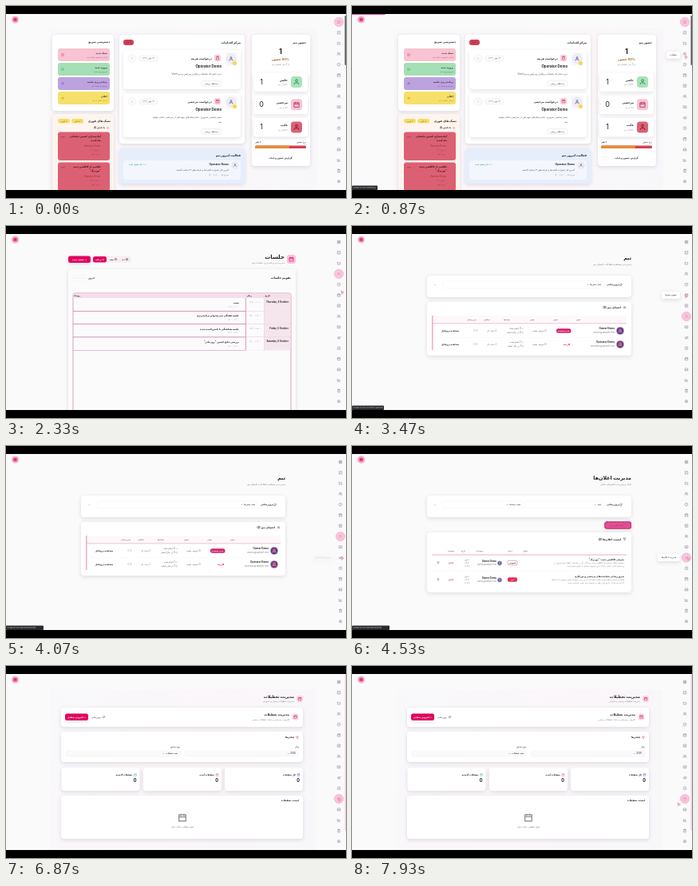
Write an HTML page with a canvas that moves like this. It is 426 px wide and 240 px high and loops after 8 s.

```html
<!DOCTYPE html>
<html lang="fa">
<head>
<meta charset="utf-8">
<style>
html, body { margin: 0; width: 100%; height: 100%; overflow: hidden; background: #000; }
canvas { display: block; width: 100vw; height: 100vh; }
</style>
</head>
<body>
<canvas id="stage"></canvas>
<script>
const canvas = document.getElementById('stage');
const ctx = canvas.getContext('2d');
const dpr = window.devicePixelRatio || 1;
canvas.width = 426 * dpr;
canvas.height = 240 * dpr;

const LOOP = 8000;
const INK = '#25232b', GREY = '#85838c', CRIMSON = '#e0045f', PINK = '#f9c5dc';
const STAFF = 'Operator Demo', OWNER = 'Owner Demo';

// Line icons on a 24 unit grid
const ICONS = {
  grid: 'M3 3h7v7H3zM14 3h7v7h-7zM14 14h7v7h-7zM3 14h7v7H3z',
  check: 'M3 3h18v18H3zM8 12l3 3 5-6',
  folder: 'M3 5h6l2 3h10v12H3z',
  users: 'M2 21v-3q0-4 4-4h6q4 0 4 4v3M13 7a4 4 0 1 1-8 0a4 4 0 1 1 8 0M22 21v-3q0-3-3-4M16 3a4 4 0 0 1 0 8',
  user: 'M4 21v-2q0-4 4-4h8q4 0 4 4v2M16 7a4 4 0 1 1-8 0a4 4 0 1 1 8 0',
  palette: 'M12 2a10 10 0 1 0 0 20q3 0 2-3t2-3h3q3 0 3-4A10 10 0 0 0 12 2M8 8v1M13 6v1M17 10v1M7 13v1',
  calendar: 'M3 5h18v16H3zM3 10h18M8 2v5M16 2v5',
  plus: 'M3 3h18v18H3zM8 12h8M12 8v8',
  book: 'M12 7v14M12 7q-2-3-10-3v14q8 0 10 3q2-3 10-3V4q-8 0-10 3',
  horn: 'M3 11l18-6v14L3 14zM8 16l1 5h3l-1-4',
  clock: 'M22 12a10 10 0 1 1-20 0a10 10 0 1 1 20 0M12 6v6l4 2',
  inbox: 'M5 4h14l3 9v7H2v-7zM2 13h6l2 3h4l2-3h6',
  chart: 'M3 3v18h18M8 17v-5M13 17V6M18 17V10',
  clip: 'M5 4h14v18H5zM9 2h6v4H9zM9 14l2 2 4-4',
  gear: 'M15 12a3 3 0 1 1-6 0a3 3 0 1 1 6 0M12 2l3 3h4v4l3 3-3 3v4h-4l-3 3-3-3H5v-4l-3-3 3-3V5h4z',
  search: 'M18 11a7 7 0 1 1-14 0a7 7 0 1 1 14 0M16 16l5 5',
  refresh: 'M3 12a9 9 0 0 1 15-6l3 3M21 3v6h-6M21 12a9 9 0 0 1-15 6l-3-3M3 21v-6h6',
  filter: 'M2 3h20l-8 10v8l-4-2v-6z',
  left: 'M15 5l-7 7 7 7',
  right: 'M9 5l7 7-7 7'
};
for (const name in ICONS) ICONS[name] = new Path2D(ICONS[name]);
const SIDEBAR = ['grid', 'check', 'folder', 'users', 'palette', 'calendar', 'plus', 'users',
  'book', 'horn', 'clock', 'calendar', 'inbox', 'chart', 'clip', 'gear'];
const sideY = i => 20 + i * 13.28;

const clamp = v => Math.max(0, Math.min(1, v));
const easeOut = v => 1 - (1 - clamp(v)) ** 3;
const easeInOut = v => v * v * (3 - 2 * v);

function box(x, y, x2, y2, fill, r = 0, stroke) {
  ctx.beginPath();
  ctx.roundRect(x, y, x2 - x, y2 - y, r);
  if (fill) { ctx.fillStyle = fill; ctx.fill(); }
  if (stroke) { ctx.strokeStyle = stroke; ctx.lineWidth = .6; ctx.stroke(); }
}
function card(x, y, x2, y2, fill = '#fff', r = 4) {
  ctx.save();
  ctx.shadowColor = '#30204024';
  ctx.shadowBlur = 5 * dpr;
  ctx.shadowOffsetY = 1.5 * dpr;
  box(x, y, x2, y2, fill, r);
  ctx.restore();
}
function disc(x, y, r, fill, stroke) {
  box(x - r, y - r, x + r, y + r, fill, r, stroke);
}
function icon(name, x, y, size = 4, color = '#77757d') {
  ctx.save();
  ctx.translate(x - size / 2, y - size / 2);
  ctx.scale(size / 24, size / 24);
  ctx.strokeStyle = color;
  ctx.lineWidth = 2.4;
  ctx.stroke(ICONS[name]);
  ctx.restore();
}
// An underscore stands for the zero-width non-joiner
function text(s, x, y, size = 3.2, color = INK, bold = false, align = 'right') {
  ctx.font = `${bold ? 'bold ' : ''}${size}px Inter, "DejaVu Sans", sans-serif`;
  ctx.direction = 'rtl';
  ctx.textAlign = align;
  ctx.textBaseline = 'middle';
  ctx.fillStyle = color;
  ctx.fillText(s.replaceAll('_', String.fromCharCode(8204)), x, y);
}
const bold = (s, x, y, size = 3.6, color = INK, align) => text(s, x, y, size, color, true, align);
const note = (s, x, y, size = 2.7, align) => text(s, x, y, size, GREY, false, align);
const mid = (s, x, y, size = 2.8, color = INK, heavy) => text(s, x, y, size, color, heavy, 'center');
function button(s, x, y, x2, y2) {
  card(x, y, x2, y2, CRIMSON, 2.5);
  mid(s, (x + x2) / 2, (y + y2) / 2, 2.8, '#fff', true);
}
function badge(name, x, y, r, fill, color) {
  box(x - r, y - r, x + r, y + r, fill, r * .55);
  icon(name, x, y, r * 1.2, color);
}
function avatar(x, y, r, fill) {
  disc(x, y, r, fill, '#d9d4ec');
  icon('user', x, y, r * 1.15, fill === '#f0effa' ? '#39364b' : '#fff');
}
function panel(x, y, x2) {
  const g = ctx.createLinearGradient(x, y, x2, 230);
  g.addColorStop(0, '#f8f8fb');
  g.addColorStop(.5, '#fbf6f9');
  g.addColorStop(1, '#f7f7fa');
  box(x, y, x2, 230, g, 4);
}

function requestCard(dy, y2, title, symbol, date, lines) {
  card(147, 55 + dy, 294, y2, '#fff', 4);
  box(274, 58 + dy, 290, 75 + dy, '#f8f7fc', 4);
  avatar(282, 66 + dy, 5.5, '#f0effa');
  disc(286.5, 71.5 + dy, 2.5, '#f7d94a');
  badge(symbol, 265, 65 + dy, 4.2, '#f8d3df', '#c22a5c');
  bold(title, 258, 65.5 + dy, 3.4);
  box(167, 62 + dy, 190, 69 + dy, '#fafafa', 3, '#ececf0');
  mid(date, 178.5, 65.5 + dy, 2.7, '#55535c');
  disc(158, 65.5 + dy, 5, '#fafafa', '#ececf0');
  icon('left', 158, 65.5 + dy, 3.5);
  bold(STAFF, 270, 76 + dy, 4.4);
  lines.forEach((s, i) => text(s, 270, 85 + dy + i * 6.5, 3, '#55535c'));
  const y = 97 + dy + (lines.length - 1) * 6;
  box(245, y - 3.3, 270, y + 3.3, '#fff', 2, '#e4e3e8');
  mid('در انتظار بررسی', 257.5, y, 2.6);
}

function dashboard() {
  panel(52, 28, 390);
  card(58, 36, 135, 131);
  bold('دسترسی سریع', 130, 45, 3.6);
  [['تسک جدید', 'ایجاد و تخصیص تسک جدید', '#f8c3d2', '#cf3d6c', 'plus'],
   ['پروژه جدید', 'شروع پروژه جدید', '#a5dfb5', '#26874c', 'folder'],
   ['برنامه_ریزی جلسه', 'زمان_بندی جلسه تیم', '#bca3df', '#7040ad', 'users'],
   ['اعلان', 'ارسال اعلان به تیم', '#f6e069', '#ad8d08', 'horn']
  ].forEach(([title, sub, fill, ink, symbol], i) => {
    const y = 53 + i * 18;
    box(65, y, 130, y + 16, fill, 3);
    icon(symbol, 71, y + 8, 3.6, ink);
    bold(title, 127, y + 6, 3, '#3c3442');
    text(sub, 127, y + 11, 2.4, ink);
  });

  card(58, 135, 135, 236, '#fdf5ee');
  bold('تسک های فوری', 131, 144, 3.7);
  [[65, '۲ فوری'], [82, '۵ تاخیر']].forEach(([x, s]) => {
    box(x, 141, x + 15, 146.5, '#f7dc68', 2.5);
    mid(s, x + 7.5, 144, 2.5, '#755b08');
  });
  icon('clock', 127.5, 152.5, 3, '#d93c57');
  bold('با تاخیر (5)', 124, 152.5, 2.8);
  [['آماده_سازی کمپین تبلیغاتی', 'ماه آینده'],
   ['عکاسی از کالکشن جدید', '"نوربرگ"']].forEach((lines, i) => {
    const y = 157.5 + i * 38;
    box(65, y, 130, y + 35.5, '#dc6073', 3);
    lines.forEach((s, n) => bold(s, 119, y + 5.5 + n * 5.5, 3.1, '#351420'));
    mid('فوری', 71, y + 5.5, 2.4, '#6b2437');
    text(STAFF, 118, y + 18, 2.8, '#8c3348');
    text('۱۰ مهر ۱۴۰۴', 118, y + 23, 2.4, '#8c3348');
    text('۱ روز تاخیر', 118, y + 28, 2.4, '#8c3348');
  });

  card(142, 36, 299, 172);
  bold('مرکز اقدامات', 294, 45.5, 3.7);
  box(147, 42, 160, 49, '#cf4059', 3);
  mid('۲ مورد', 153.5, 45.5, 2.5, '#511320');
  requestCard(0, 104, 'درخواست هزینه', 'clip', '۱۳ مهر, ۱۴۰۴',
    ['خرید اشتراک یکساله نرم_افزار ویرایش ویدیو Vorel']);
  requestCard(54, 164, 'درخواست مرخصی', 'calendar', '۱۲ مهر, ۱۴۰۴',
    ['سفر شخصی ضروری. تمام تسک_های مهم قبل از مرخصی انجام خواهد', 'شد.']);

  card(142, 178, 299, 222, '#e6eefc');
  bold('فعالیت امروز تیم', 294, 186.5, 3.8);
  box(147, 193, 294, 217, '#f3f7fd', 4);
  avatar(287, 199, 4, '#f0effa');
  bold(STAFF, 279, 198.5, 3.3);
  text('آخرین کار: پاسخ به کامنت_ها و دایرکت_های ۲۴ ساعت گذشته', 279, 205, 2.7, '#45434c');
  note('شروع کار: ۱۲:۰۰ تا ۱۴:۰۰', 279, 211, 2.4);
  text('✓ ۱ کار تکمیل شده', 176, 198.5, 2.7, '#178b61');

  card(308, 36, 381, 200);
  bold('حضور تیم', 376, 45.5, 3.5);
  mid('1', 344, 57, 9, INK, true);
  mid('50% حضور', 344, 66.5, 4, '#a5671f', true);
  note('از 2 نفر اعضای تیم', 344, 73, 2.8, 'center');
  [['حاضر', '50% از تیم', '1', '#a9e3b9', '#24804a'],
   ['مرخصی', '0% از تیم', '0', '#f7c4d3', '#b53461'],
   ['غایب', '50% از تیم', '1', '#dc6073', '#6d1429']].forEach(([name, sub, n, fill, ink], i) => {
    const y = 95 + i * 28.3;
    card(310, y - 11.5, 378, y + 12, '#fff', 3);
    badge(i === 1 ? 'calendar' : 'user', 364, y, 7, fill, ink);
    bold(name, 353, y - 2.5, 3.7);
    note(sub, 353, y + 3.5, 2.5);
    mid(n, 320, y, 9, INK);
  });
  text('نرخ حضور', 376, 170, 2.8);
  bold('1 نفر', 319, 170, 2.7);
  box(312, 174.5, 376, 178, '#d6404f', 1.5);
  box(312, 174.5, 355, 178, '#e68b3b', 1.5);
  box(313, 185, 376, 196, '#fff', 3);
  mid('گزارش حضور و غیاب', 344, 190.5, 2.9, INK, true);
}

function meetings() {
  bold('جلسات', 349, 38.5, 7);
  note('مدیریت و برنامه_ریزی جلسات تیم', 349, 46, 3);
  badge('calendar', 357.5, 41.5, 5.5, '#f7c3d8', CRIMSON);
  button('+  جلسه جدید', 78, 37.5, 106, 46);
  box(108, 37.5, 157, 46, '#f8eef2', 3);
  box(109, 38, 126, 45.5, CRIMSON, 2.5);
  mid('☰ برنامه', 117.5, 41.7, 2.7, '#fff', true);
  mid('هفته', 132, 41.7, 2.8);
  icon('calendar', 137.5, 41.7, 3, INK);
  mid('ماه', 147, 41.7, 2.8);
  icon('grid', 151.5, 41.7, 3, INK);
  card(78, 54, 363, 240, '#fcfbfc');
  bold('تقویم جلسات', 357, 65, 3.8);
  mid('امروز', 107, 65, 2.8, INK, true);
  [['right', 87], ['left', 96]].forEach(([s, x]) => {
    disc(x, 65, 3.5, '#fff', '#eeecef');
    icon(s, x, 65, 2.8, INK);
  });
  box(84, 84, 357, 235, '#fcfbfc', 2, '#bd6694');
  box(84.3, 84.3, 356.7, 90, '#f5deea');
  bold('تاریخ', 331, 87, 2.7);
  bold('زمان', 308, 87, 2.7);
  bold('رویداد', 93, 87, 2.7);
  const rows = [
    ['Thursday, 4 October', '۱۰:۰۰ – ۱۱:۳۰', 'تست'],
    ['', '۱۲:۰۰ – ۱۳:۰۰', 'جلسه هفتگی تیم محتوا و برنامه_ریزی'],
    ['Friday, 5 October', '۱۵:۰۰ – ۱۶:۳۰', 'جلسه هماهنگی با تامین_کننده جدید'],
    ['Saturday, 6 October', '۱۲:۰۰ – ۱۳:۰۰', 'بررسی نتایج کمپین "روز مادر"']];
  rows.forEach(([day, time, title], i) => {
    const y = 90 + i * 16.3;
    box(323.5, y, 356.5, y + 16, '#f5e5ed');
    if (day) bold(day, 354, y + 5.5, 2.8);
    mid(time, 312, y + 5.5, 2.5, GREY);
    bold(title, 292, y + 6, 3);
    note(time, 292, y + 11, 2.4);
    box(84, y + 16, 300, y + 16.7, '#c878a2');
    box(300, y + 16, 357, y + 16.4, '#e9c7d8');
  });
  box(300, 90, 300.7, 155, '#c878a2');
  box(323, 90, 323.4, 155, '#e5bbd0');
}

function heading(title, sub) {
  bold(title, 350, 40, 6.3);
  note(sub, 350, 48.5, 3);
  card(94, 62, 350, 89);
  icon('refresh', 337, 73.5, 3.5, INK);
  bold('بروزرسانی', 335, 73.5, 2.9);
  icon('search', 104, 73.5, 3, '#b8b5bd');
}

function team() {
  heading('تیم', 'مدیریت و مشاهده اطلاعات اعضای تیم');
  box(114, 69, 316, 78, '#fff', 3, '#f5f3f5');
  text('همه بخش_ها  ⌄', 312, 73.5, 2.8);
  card(94, 95, 350, 162);
  icon('users', 341.5, 102, 3.5, INK);
  bold('اعضای تیم (2)', 337, 102, 3.4);
  box(100, 112, 344, 122, '#fdf9fb');
  [['عضو', 284], ['نقش', 255], ['بخش', 226], ['تسک_ها', 194], ['عملکرد', 169], ['سرپرستان', 150]]
    .forEach(([s, x]) => mid(s, x, 117, 2.7, '#55535c'));
  box(100, 121.5, 344, 122.3, '#efacc9');
  box(100, 112, 101.5, 155, '#f2a8c9');
  [[OWNER, 'owner@sample.test'], [STAFF, 'operator@sample.test']].forEach(([name, mail], i) => {
    const y = 131 + i * 17;
    avatar(336, y, 4.8, i ? '#694078' : '#534285');
    disc(336, y, 2, '#e55092');
    bold(name, 329, y - 2.5, 3.1);
    note(mail, 329, y + 2.5, 2.9);
    if (i) mid('کارمند', 269, y, 2.8, CRIMSON, true);
    else {
      box(256, y - 2.8, 274.5, y + 2.8, '#d52370', 2.5);
      mid('مدیر سیستم', 265, y, 2.5, '#fff', true);
    }
    mid('○ تعریف نشده', 235, y, 2.8, '#55535c');
    text(`✓ ${i} انجام شده`, 215, y - 2.7, 2.8, '#55535c');
    text(`◷ ${i} در حال انجام`, 215, y + 2.5, 2.8, '#55535c');
    mid(`${i * 2} تسک کل`, 175, y, 2.8, GREY);
    mid('○ 0', 155, y, 2.8, GREY);
    mid('مشاهده پروفایل', 123, y, 2.8, INK, true);
    if (!i) box(102, 139.3, 344, 139.6, '#eeeaee');
  });
}

function announcements(age) {
  heading('مدیریت اعلان_ها', 'ایجاد و مدیریت اعلان_های داخلی');
  box(114, 69, 214, 78, '#fff', 3, '#f5f3f5');
  box(217, 69, 316, 78, '#fff', 3, '#f5f3f5');
  text('همه  ⌄', 312, 73.5, 2.8);
  text('همه دسته_ها  ⌄', 211, 73.5, 2.8);
  const ready = clamp((age - 330) / 250);
  button('+  ایجاد اعلان جدید', 316.5, 94.5, 350, 103.5);
  if (ready < 1) {
    ctx.save();
    ctx.globalAlpha *= 1 - ready;
    box(316.5, 94.5, 350, 103.5, '#e54f96', 2.5);
    ctx.setLineDash([1.5, 1]);
    box(317, 95, 349.5, 103, null, 2.5, '#5a1c3c');
    mid('+  ایجاد اعلان جدید', 333, 99, 2.8, '#a92865');
    ctx.restore();
  }
  card(94, 108, 350, 183);
  icon('filter', 341.5, 116.5, 4, INK);
  bold('لیست اعلان_ها (2)', 337, 116.5, 3.4);
  [['عنوان', 217], ['دسته', 198], ['نویسنده', 160], ['تاریخ', 139.5], ['وضعیت', 124]]
    .forEach(([s, x]) => mid(s, x, 131, 2.7, '#55535c'));
  box(100, 135.6, 344, 136.4, '#efacc9');
  [['معرفی کالکشن جدید: "نوربرگ"', 'با هیجان اعلام می_کنیم که کالکشن جدید زیورآلات ما در راه است. لطفا برای فروش در',
    'وب_سایت آماده باشید. جزئیات این مجموعه شامل ۱۲ طرح خاص است.'],
   ['به_روزرسانی سیاست_های مرخصی و دورکاری', 'همکاران گرامی، لطفا توجه داشته باشید که از این پس درخواست_های مرخصی باید حداقل',
    '۷۲ ساعت قبل از تاریخ مورد نظر در سیستم ثبت شوند. سیاست جدید...']
  ].forEach(([title, first, second], i) => {
    const y = 146 + i * 21;
    bold(title, 341, y - 4, 2.9);
    note(first, 341, y + .5, 2.5);
    note(second, 341, y + 4.5, 2.5);
    box(195, y - 2.8, 207, y + 2.8, i ? '#e52b55' : '#fff', 2, i ? null : '#db718f');
    mid(i ? 'تیم' : 'عمومی', 201, y, 2.5, i ? '#fff' : INK, true);
    avatar(185, y + .5, 2.8, '#6651ae');
    bold(OWNER, 181, y - 2, 2.9);
    note('owner@sample.test', 181, y + 2.5, 2.6);
    ['۶ مهر', '۱۴۰۴', '۱۱:۲۶'].forEach((s, n) => mid(s, 144, y - 4 + n * 4, 2.5, '#55535c'));
    mid('عادی', 124, y, 2.8, '#e02b56', true);
    icon('filter', 108, y, 3, INK);
    if (!i) box(100, 156.5, 344, 156.8, '#eeeaee');
  });
}

function holidays() {
  panel(55, 29, 389);
  bold('مدیریت تعطیلات', 361, 38.5, 4.8);
  note('مدیریت تعطیلات رسمی و عمومی', 361, 44.5, 2.8);
  badge('calendar', 368, 41, 4, '#fbd9e5', CRIMSON);
  card(69, 52, 372, 76);
  bold('مدیریت تعطیلات', 355, 61, 4);
  note('افزودن، ویرایش و حذف تعطیلات رسمی', 355, 67, 2.8);
  badge('calendar', 362.5, 63.5, 4, '#fbd9e5', CRIMSON);
  button('+  افزودن تعطیل', 74, 59.5, 103, 68);
  icon('refresh', 122.5, 63.7, 3.2, INK);
  text('بروزرسانی', 119, 63.7, 2.7);
  card(69, 82, 372, 120);
  icon('filter', 365, 89.5, 3.8, CRIMSON);
  bold('فیلترها', 361, 89.5, 3.1);
  text('سال', 367, 101, 2.8);
  mid('نوع نمایش', 212, 101, 2.8);
  box(224, 106, 367, 113, '#fbfafb', 3, '#f3f1f4');
  box(75, 106, 219, 113, '#fbfafb', 3, '#f3f1f4');
  text('2025  ⌄', 363, 109.5, 2.8);
  text('همه تعطیلات  ⌄', 215, 109.5, 2.8);
  [['کل تعطیلات', 372, '#4358a8'], ['تعطیلات آینده', 270, '#d24b83'], ['تعطیلات گذشته', 167.5, '#31b69b']]
    .forEach(([s, x, color]) => {
      card(x - 98, 127, x, 156);
      icon('calendar', x - 5.5, 136, 3.8, color);
      bold(s, x - 9, 136, 2.8);
      bold('0', x - 4, 143, 5.5);
    });
  card(69, 162, 372, 216);
  bold('لیست تعطیلات', 367, 168.5, 3.1);
  icon('calendar', 221, 189.5, 11.5, '#85838c');
  note('هیچ تعطیلی یافت نشد', 221, 201, 3.1, 'center');
}

const PAGES = [
  { from: -1000, draw: dashboard, active: 0, x: 417, thumb: [12, 74, '#55535c'] },
  { from: 1250, draw: meetings, active: 3, x: 417 },
  { from: 2900, draw: team, active: 7, x: 419 },
  { from: 4200, draw: announcements, active: 9, x: 419 },
  { from: 6600, draw: holidays, active: 11, x: 417, thumb: [10, 206, '#f3d0df'] }
];
// Cursor stops: time, x, y
const CURSOR = [[400, 424, 40], [800, 418, 64], [1700, 418, 63], [2330, 421, 83], [2650, 420, 114],
  [2950, 420, 114], [3400, 418, 88], [3650, 418, 88], [4100, 421, 141], [5250, 421, 141],
  [5850, 419, 153], [6150, 419, 154], [6400, 418, 167], [7300, 417, 168], [7900, 409, 173]];
// Each entry below starts with its time span
const TIPS = [[650, 1450, 'جلسات', 3, 17], [2620, 2950, 'تیم', 7, 14], [3350, 3750, 'تقویم محتوا', 5, 23],
  [4050, 4950, 'مدیریت اعلان_ها', 9, 28], [5700, 6250, 'مدیریت حضور و غیاب', 10, 38]];
const STATUS = [[700, 1400, 'localhost:3000/meetings', 32], [3200, 3850, 'localhost:3000/content-calendar', 40],
  [3850, 4950, 'localhost:3000/announcements', 47]];
const LOADING = [[830, 1250, 320], [2750, 2900, 320], [5700, 6600, 95]];
const during = t => ([from, to]) => t >= from && t < to;

function drawSidebar(page) {
  if (page.thumb) box(424.5, page.thumb[0], 426, page.thumb[1], page.thumb[2], .7);
  disc(page.x, sideY(page.active), 5.7, PINK, '#f3aaca');
  SIDEBAR.forEach((name, i) => icon(name, page.x, sideY(i), 4.6, i === page.active ? '#e58fb5' : '#77757d'));
}

function drawCursor(t) {
  const next = CURSOR.findIndex(stop => stop[0] > t);
  if (next === 0) return;
  const b = next < 0 ? CURSOR.at(-1) : CURSOR[next];
  const a = next < 0 ? b : CURSOR[next - 1];
  const p = a === b ? 0 : easeInOut((t - a[0]) / (b[0] - a[0]));
  ctx.save();
  ctx.translate(a[1] + (b[1] - a[1]) * p, a[2] + (b[2] - a[2]) * p);
  ctx.beginPath();
  ctx.moveTo(-1, -2);
  ctx.lineTo(2.5, 0);
  ctx.lineTo(.8, .6);
  ctx.lineTo(0, 2.3);
  ctx.closePath();
  ctx.fillStyle = PINK;
  ctx.strokeStyle = '#d86d9d';
  ctx.lineWidth = .5;
  ctx.fill();
  ctx.stroke();
  ctx.restore();
}

function drawTip(t) {
  const tip = TIPS.find(during(t));
  if (!tip) return;
  const [from, , label, i, width] = tip;
  const y = sideY(i) + (i === 3 ? 1.5 : 0);
  ctx.globalAlpha = clamp((t - from) / 120);
  card(411 - width, y - 4.5, 411, y + 4.5, '#fff', 2);
  mid(label, 411 - width / 2, y, 2.9);
  ctx.globalAlpha = 1;
}

function draw(now) {
  const t = now % LOOP;
  ctx.setTransform(dpr, 0, 0, dpr, 0, 0);
  box(0, 0, 426, 240, '#000');
  ctx.save();
  ctx.beginPath();
  ctx.rect(0, 10, 426, 220);
  ctx.clip();
  box(0, 10, 426, 230, '#fafafa');

  const page = PAGES.findLast(p => t >= p.from);
  const age = t - page.from;
  const enter = easeOut(age / 320);
  ctx.save();
  ctx.globalAlpha = enter;
  ctx.translate(0, (1 - enter) * 5);
  page.draw(age);
  ctx.restore();

  disc(11.5, 17, 4.5 + .25 * Math.sin(t / 1000 * Math.PI), '#f8adcb');
  badge('user', 11.5, 17, 2.3, '#e64c8a', '#7d123f');
  drawSidebar(page);
  drawTip(t);
  drawCursor(t);

  const load = LOADING.find(during(t));
  if (load) box(0, 10, 345 * (1 - Math.exp((load[0] - t) / load[2])), 11, '#ee4f91');
  const status = STATUS.find(during(t));
  if (status) {
    box(0, 224.5, status[3], 230, '#292a2d', 1);
    text(status[2], 1.5, 227.3, 2.4, '#b9babd', false, 'left');
  }
  ctx.restore();
}

function frame() {
  draw(performance.now());
  requestAnimationFrame(frame);
}
frame();
</script>
</body>
</html>
```
